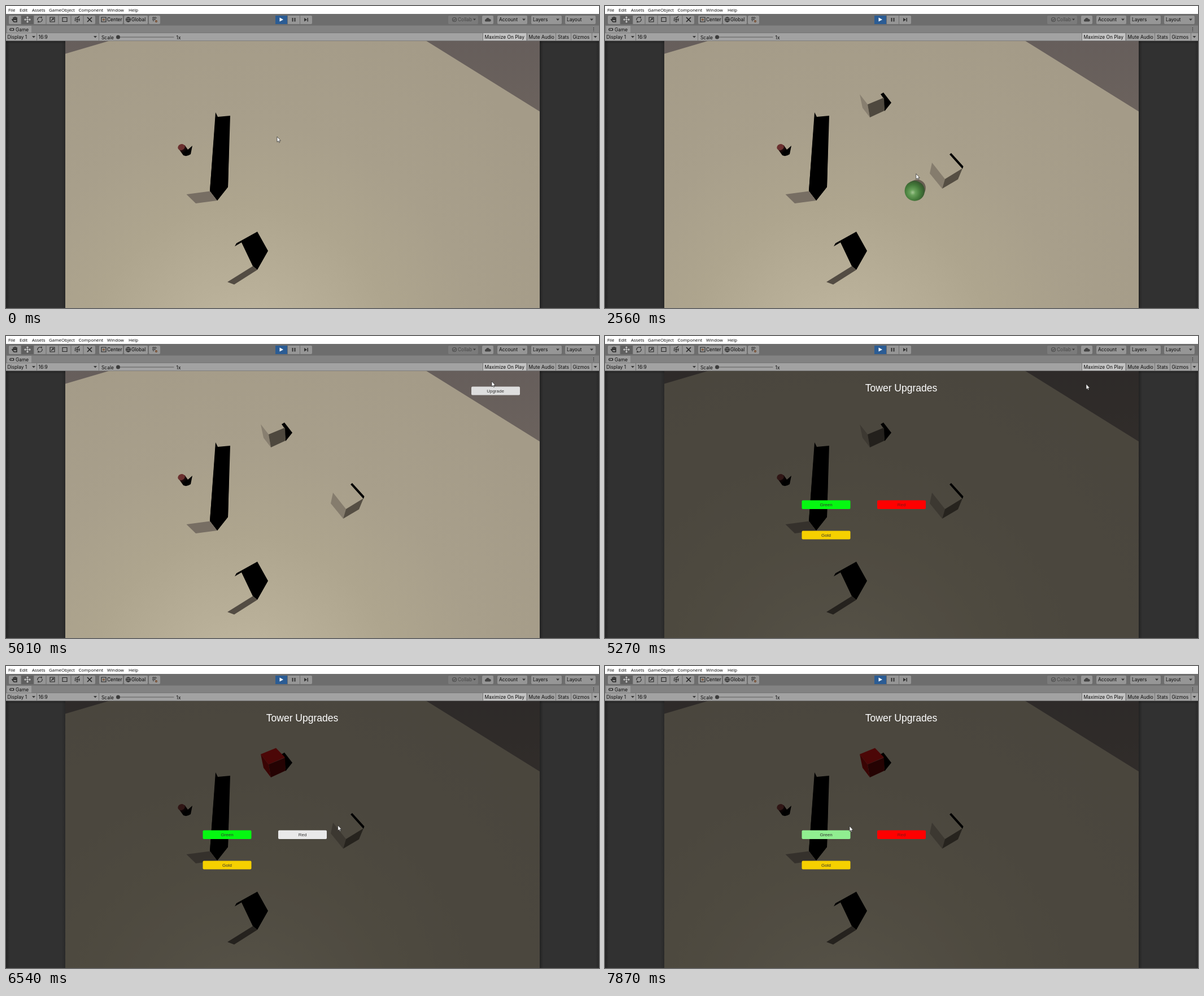
Write an HTML page that moves like this. It is 1050 px wide and 534 px high and loops after 8000 ms.

```html
<!DOCTYPE html>
<html lang="en">
<head>
<meta charset="utf-8">
<title>Tower placement and upgrades</title>
<style>
  html, body { margin: 0; width: 100%; height: 100%; overflow: hidden; background: #313131; }
  svg { display: block; width: 1050px; height: 534px; }
  .menu { font: 7.9px "Open Sans", sans-serif; fill: #000; }
  .ui { font: 8.4px Inter, sans-serif; fill: #0c0c0c; }
  .game { font: 8px "Liberation Sans", Arial, sans-serif; fill: #323232; text-anchor: middle; }
  .title { font-size: 17.5px; fill: #fff; }
  .btn { fill: #969696; }
  .icon { fill: none; stroke: #262626; stroke-width: 1.1; }
  .arrow { fill: #3a3a3a; }
</style>
</head>
<body>
<svg viewBox="0 0 1050 534">
  <defs>
    <radialGradient id="ground" gradientUnits="userSpaceOnUse" cx="420" cy="620" r="640">
      <stop offset="0" stop-color="#c3baa3"/>
      <stop offset=".2" stop-color="#b8af98"/>
      <stop offset=".42" stop-color="#aea58e"/>
      <stop offset=".65" stop-color="#a89f8b"/>
      <stop offset="1" stop-color="#a49b88"/>
    </radialGradient>
    <linearGradient id="sky" x2="0" y2="1">
      <stop offset="0" stop-color="#665e5b"/>
      <stop offset="1" stop-color="#6b625d"/>
    </linearGradient>
    <linearGradient id="pipe" x2=".8" y2=".7">
      <stop offset=".3" stop-color="#3a1a19"/>
      <stop offset=".75" stop-color="#000"/>
    </linearGradient>
    <linearGradient id="edge">
      <stop offset="0" stop-color="#222"/>
      <stop offset=".06" stop-color="#313131"/>
      <stop offset=".94" stop-color="#313131"/>
      <stop offset="1" stop-color="#292929"/>
    </linearGradient>
    <linearGradient id="topShade" x2="0" y2="1">
      <stop offset="0" stop-color="#000" stop-opacity=".3"/>
      <stop offset="1" stop-color="#000" stop-opacity="0"/>
    </linearGradient>
    <radialGradient id="redBall" cx=".5" cy=".56" r=".56">
      <stop offset="0" stop-color="#d09a8c"/>
      <stop offset=".25" stop-color="#a8665a"/>
      <stop offset=".65" stop-color="#864840"/>
      <stop offset="1" stop-color="#553630"/>
    </radialGradient>
    <radialGradient id="greenBall" cx=".4" cy=".58" r=".64">
      <stop offset="0" stop-color="#a3c692"/>
      <stop offset=".22" stop-color="#68a05a"/>
      <stop offset=".6" stop-color="#447a3a"/>
      <stop offset="1" stop-color="#34502c"/>
    </radialGradient>
    <filter id="soft"><feGaussianBlur stdDeviation=".6"/></filter>
  </defs>

  <!-- Game view -->
  <rect y="61" width="105" height="473" fill="url(#edge)"/>
  <rect x="945" y="61" width="105" height="473" fill="url(#edge)"/>
  <rect y="61" width="1050" height="6" fill="url(#topShade)"/>
  <rect x="105" y="61" width="840" height="473" fill="url(#ground)"/>
  <path d="M105 61H185L105 84.500Z M743 61L945 186.500V61Z" fill="url(#sky)"/>

  <path d="M371 188L375 196L397 194L393 320L374 344L361 327Z" filter="url(#soft)"/>
  <path d="M371.500 190L361 327L374 344L393 320L395 240L374 197Z"/>
  <path d="M319.500 333L361 327.500L374 344L336 349Z" fill="#776e63"/>
  <path d="M405 425L408 419.500L445 399L464 433L445 466.500L437 460L417 418Z" filter="url(#soft)"/>
  <path d="M392 488L437 460L445 466.500L404 492.500Z" fill="#534c43"/>
  <path d="M304.500 251L314 264Q320 267 327 262L330 247L322 254L316.500 246Z" fill="url(#pipe)"/>
  <ellipse cx="310.500" cy="249.500" rx="6.300" ry="5.300" transform="rotate(-25 310.500 249.500)" fill="#6b302f"/>

  <g id="cubeA">
    <path d="M488 156L493 153L507 171L495 186L493 163Z" filter="url(#soft)"/>
    <path id="topFace" d="M451 156L478 145L494 161.500L465 174Z" fill="#aa1010"/>
    <path id="leftFace" d="M451 156L465 174L469 197L456 180Z"/>
    <path id="rightFace" d="M465 174L494 162L495 185L469 197Z"/>
  </g>
  <g id="cubeB">
    <path d="M610 262.500L613 260L634.500 283.500L633 288Z"/>
    <path d="M579 277L602 306L597 323L575 296Z" fill="#857c6d"/>
    <path d="M602 306L633 287L625 306.500L597 323Z" fill="#554e43"/>
  </g>
  <g id="ball">
    <circle id="ballShadow" cx="4.500" cy="-5" r="15" fill="#685f52" filter="url(#soft)"/>
    <circle id="ballBody" r="18" filter="url(#soft)"/>
  </g>

  <g id="upgrade" class="game">
    <rect id="upgradeFace" x="824" y="89.500" width="86" height="15" rx="2"/>
    <text x="866.500" y="100">Upgrade</text>
  </g>
  <g id="panel" class="game">
    <rect x="105" y="61" width="840" height="473" fill-opacity=".55" fill="#000"/>
    <text class="title" x="524.500" y="98">Tower Upgrades</text>
    <rect id="green" x="348.500" y="290.500" width="86" height="15.500" rx="2"/>
    <text x="391.500" y="301">Green</text>
    <rect id="red" x="482" y="290.500" width="86" height="15.500" rx="2"/>
    <text id="redLabel" x="525" y="301">Red</text>
    <rect x="348.500" y="344.500" width="86" height="15" rx="2" fill="#f6d000"/>
    <text x="391.500" y="355">Gold</text>
  </g>

  <!-- Editor bars -->
  <rect width="1050" height="14" fill="#fff"/>
  <g class="menu">
    <text x="4" y="10">File</text><text x="24" y="10">Edit</text>
    <text x="46" y="10">Assets</text><text x="76" y="10">GameObject</text>
    <text x="128.500" y="10">Component</text><text x="179" y="10">Window</text>
    <text x="217" y="10">Help</text>
  </g>
  <rect y="14" width="1050" height="21" fill="#6d6d6d"/>
  <rect y="34.500" width="1050" height="13" fill="#828282"/>
  <path d="M2 35H45V48H2Z" fill="#9d9d9d"/>
  <path d="M0 47.500H1050V61.500H0Z" fill="#a2a2a2"/>
  <path d="M0 47.500H1050M0 61.500H1050" stroke="#777" stroke-width=".8"/>
  <path d="M845 48H921V61H845Z" fill="#c4c4c4"/>
  <path d="M54.500 48V61M164.500 48V61M844.500 48V61M922.500 48V61M973.500 48V61M1000.500 48V61M1037.500 48V61" stroke="#777"/>
  <g class="btn">
    <rect x="5" y="17" width="153" height="15" rx="2"/>
    <rect x="165" y="17" width="42" height="15" rx="2"/>
    <rect x="209" y="17" width="42" height="15" rx="2"/>
    <rect x="253" y="17" width="20" height="15" rx="2"/>
    <rect x="477" y="17" width="65" height="15" rx="2"/>
    <rect x="783" y="17" width="53" height="15" rx="2" fill="#7b7b7b"/>
    <rect x="843" y="17" width="20" height="15" rx="2"/>
    <rect x="870" y="17" width="53" height="15" rx="2"/>
    <rect x="930" y="17" width="54" height="15" rx="2"/>
    <rect x="990" y="17" width="54" height="15" rx="2"/>
  </g>
  <path d="M27 17H49V32H27Z" fill="#606060"/>
  <path d="M477 17H498V32H477Z" fill="#2b5c94"/>
  <path d="M27 17V32M49 17V32M71 17V32M93 17V32M115 17V32M137 17V32M498.500 17V32M520.500 17V32" stroke="#6b6b6b"/>
  <g class="icon">
    <path d="M13 24V20M15 24V19M17 24V19M19 25V20M11 24L14 28H19V24H13Z" stroke-width="1.500"/>
    <path d="M38 19V29M33 24H43M36.500 20.500L38 19L39.500 20.500M36.500 27.500L38 29L39.500 27.500M34.500 22.500L33 24L34.500 25.500M41.500 22.500L43 24L41.500 25.500" stroke="#d0d0d0"/>
    <path d="M56 25A4.200 4.200 0 0 1 63 21V18.500M64 23A4.200 4.200 0 0 1 57 27V29.500"/>
    <path d="M78 20H86V28H78ZM80 26L84 22M82 22H84V24"/>
    <path d="M100 20.500H108V27.500H100Z"/>
    <circle cx="126" cy="24" r="4" stroke-dasharray="3 1.500"/>
    <path d="M126 20V28M122 24H130M128 20L130 18"/>
    <path d="M144 20L152 28M152 20L144 28" stroke-width="1.700"/>
    <path d="M169 20H177V28H169Z"/><circle cx="173" cy="24" r="1.300" stroke="#713e1a"/>
    <circle cx="216.500" cy="24" r="4"/><path d="M212.500 24H220.500M216.500 20Q213 24 216.500 28Q220 24 216.500 20"/>
    <path d="M259 21H267M259 24H264M261 19V28M264 19V25" stroke-dasharray="2 1"/>
    <circle cx="266" cy="27" r="1.400" stroke="#713e1a"/>
    <circle cx="794" cy="24" r="3.500" stroke="#4a4a4a"/><path d="M792 24L793.500 25.500L796 22.500" stroke="#4a4a4a"/>
    <path d="M8 39.500H13Q15 41.500 13 43.500H8Q5 41.500 8 39.500M8 41.500H10M12 41.500H13"/>
    <path d="M1040.500 38V45" stroke-dasharray="1.200 1.500"/>
  </g>
  <path d="M484.500 20.500L491 24L484.500 27.500Z" fill="#fff"/>
  <path d="M506.500 21H508.500V27.500H506.500ZM510.500 21H512.500V27.500H510.500ZM528 21L533 24.250L528 27.500ZM533.500 21H535V27.500H533.500Z" fill="#333"/>
  <path d="M849 27.500A2.500 2.500 0 0 1 850 23A3.200 3.200 0 0 1 856 23A2.300 2.300 0 0 1 857 27.500Z" fill="#444"/>
  <path class="arrow" d="M914 22.500h6l-3 3.500ZM974 22.500h6l-3 3.500ZM1034 22.500h6l-3 3.500ZM827 22.500h5l-2.500 3ZM46 53h6l-3 3.500ZM155 53h6l-3 3.500ZM1040.500 53h6l-3 3.500Z"/>
  <g class="ui">
    <text x="179" y="27">Center</text><text x="222" y="27">Global</text>
    <text x="800" y="27" fill="#484848">Collab</text><text x="873" y="27">Account</text>
    <text x="933" y="27">Layers</text><text x="993" y="27">Layout</text>
    <text x="17" y="44.500">Game</text><text x="2.500" y="57.500">Display 1</text>
    <text x="57.500" y="57.500">16:9</text><text x="169" y="58.500">Scale</text>
    <text x="301.500" y="58.500">1x</text><text x="847.500" y="57.500">Maximize On Play</text>
    <text x="925.500" y="57.500">Mute Audio</text><text x="977" y="57.500">Stats</text>
    <text x="1003.500" y="57.500">Gizmos</text>
  </g>
  <path d="M198 55H297.500" stroke="#5c5c5c"/>
  <circle cx="198.500" cy="55" r="3.500" fill="#3c3c3c"/>

  <path id="cursor" d="M0 0V9.500L2.100 7.600L3.500 10.600L4.900 10L3.600 7.100H6.400Z" fill="#fff" stroke="#222" stroke-width=".7"/>
</svg>
<script>
const LOOP = 8000;
const $ = id => document.getElementById(id);
const show = (id, on) => $(id).style.display = on ? '' : 'none';
const fill = (id, color) => $(id).setAttribute('fill', color);
const within = (t, from, to) => t >= from && t < to;

// Pointer path: time, x, y
const path = [
  [0, 480, 231], [70, 482, 241], [330, 476, 170], [530, 476, 170], [730, 526, 232],
  [990, 592, 304], [1190, 592, 304], [1520, 590, 290], [1800, 587, 284], [2290, 575, 288],
  [3160, 497, 316], [3490, 495, 321], [3620, 496, 321], [3820, 508, 318], [3950, 500, 235],
  [4150, 474, 182], [4350, 477, 147], [4550, 477, 147], [4810, 876, 90], [5010, 860, 80],
  [5270, 852, 85], [5530, 694, 205], [5790, 530, 292], [6340, 532, 293], [6470, 579, 287],
  [6680, 640, 250], [7280, 830, 95], [7480, 841, 88], [7610, 838, 90], [7740, 598, 199],
  [7870, 433, 283]
];

const refreshes = path.map(key => key[0]);
for (const [from, to, count] of [[1520, 2290, 12], [2360, 3160, 9], [6120, 6880, 11]])
  for (let i = 0; i < count; i++)
    refreshes.push(Math.round(from + (to - from) * i / (count - 1)));
refreshes.push(3290, 3360, 6950, 7020, 7150, 7350);
refreshes.sort((a, b) => a - b);

function pointerAt(t) {
  const next = path.findIndex(key => key[0] > t);
  if (next < 0) return path[path.length - 1].slice(1);
  const a = path[next - 1], b = path[next];
  const k = (t - a[0]) / (b[0] - a[0]);
  return [a[1] + (b[1] - a[1]) * k, a[2] + (b[2] - a[2]) * k];
}

function draw(now) {
  const clock = now % LOOP;
  const t = refreshes.filter(time => time <= clock).pop();
  const [x, y] = pointerAt(t);
  $('cursor').setAttribute('transform', `translate(${x} ${y})`);

  show('cubeA', t >= 530);
  show('cubeB', t >= 1190);
  const painted = t >= 6120;
  show('topFace', painted);
  fill('leftFace', painted ? '#820a0a' : '#887f70');
  fill('rightFace', painted ? '#520606' : '#4e483e');

  // The placement ball hangs below the pointer and grows towards the camera.
  const near = (587 - x) / 92;
  const free = t >= 2360;
  show('ball', within(t, 1520, 3950));
  $('ball').setAttribute('transform', `translate(${x - 6 + 9 * near} ${y + 31 - 2 * near})`);
  $('ballBody').setAttribute('r', 17 + 2 * near);
  fill('ballBody', free ? 'url(#greenBall)' : 'url(#redBall)');
  show('ballShadow', free);

  show('upgrade', within(t, 4350, 5270) || within(t, 6680, 7610));
  fill('upgradeFace', within(t, 5010, 5270) ? '#dedede' : '#ededed');
  show('panel', within(t, 5270, 6680) || t >= 7610);
  const redHover = within(t, 5790, 6680);
  fill('red', redHover ? '#e9e9e9' : '#ff0000');
  $('redLabel').style.fill = redHover ? '#323232' : '#7c1414';
  fill('green', t >= 7870 ? '#90ee90' : '#05f811');
}

function tick(now) {
  draw(now);
  requestAnimationFrame(tick);
}
draw(0);
requestAnimationFrame(tick);
</script>
</body>
</html>
```
